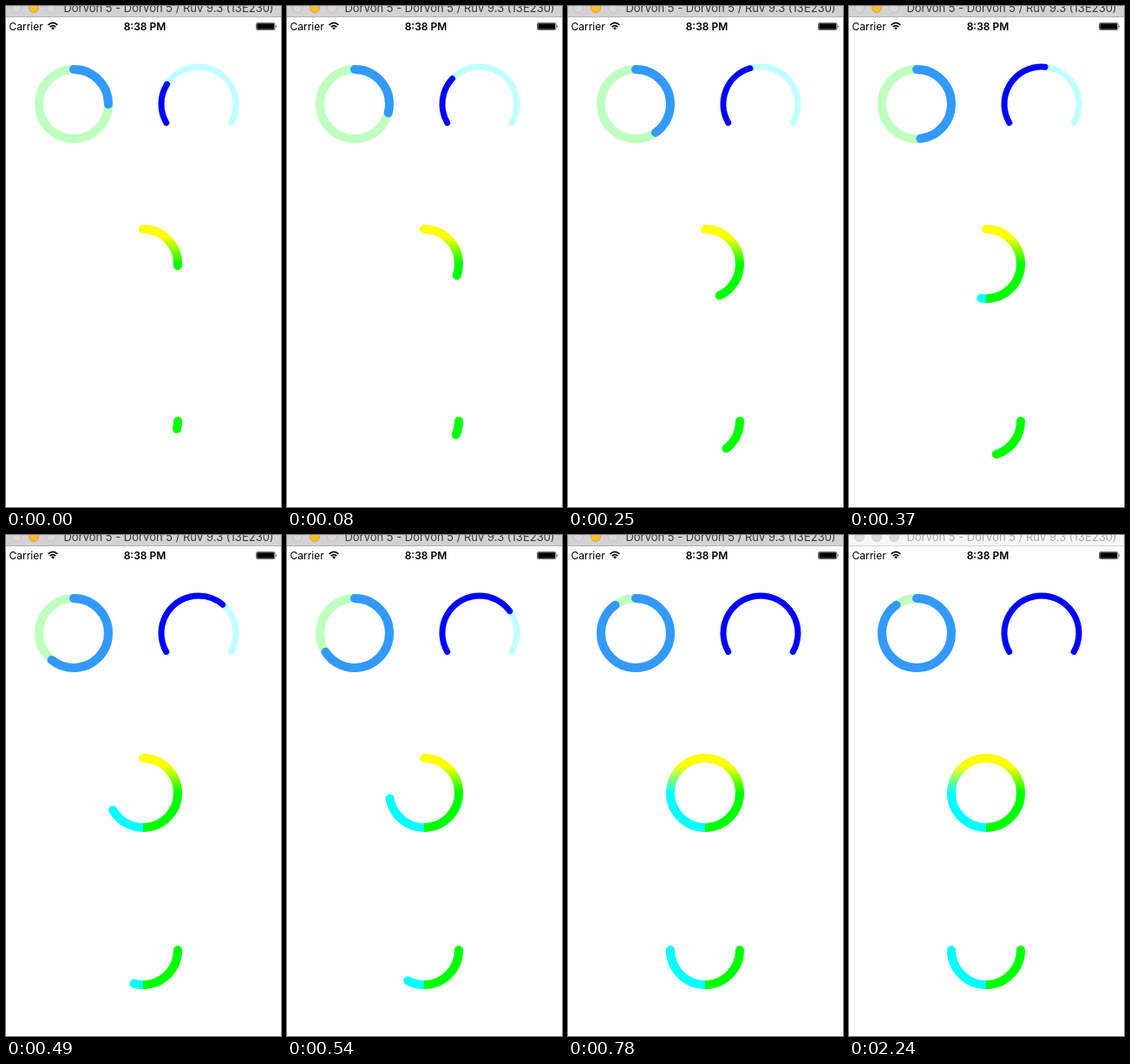
These frames come from a looping animation (317x577 px, 2.33 s). An HTML page:

```html
<!DOCTYPE html>
<html lang="en">
<head>
<meta charset="utf-8">
<title>Progress rings</title>
<style>
  html, body { margin: 0; width: 100%; height: 100%; overflow: hidden; background: #fefefe; }
  svg { display: block; width: 317px; height: 577px; }
  text { font-family: Inter, Roboto, sans-serif; font-size: 12px; }
  .arc { fill: none; stroke-linecap: round; stroke-width: 10; }
  .thin { stroke-width: 7; }

  #bar rect { fill: #d3d1d3; }
  #bar line { stroke: #b3b1b3; }
  #bar circle { fill: #d9d7d9; stroke: #c3c1c3; }
  #bar .mid { fill: #fdbd2f; stroke: #e3a32c; }
  #bar text { font-size: 13px; fill: #3c3b3c; }

  #bar.idle rect { fill: #f6f6f6; }
  #bar.idle line { stroke: #d6d6d6; }
  #bar.idle circle { fill: #dadada; stroke: #d2d2d2; }
  #bar.idle text { fill: #a9a9a9; }
</style>
</head>
<body>
<svg viewBox="0 0 317 577">
  <defs>
    <linearGradient id="warmGreen" gradientUnits="userSpaceOnUse" x1="0" y1="266" x2="0" y2="297">
      <stop stop-color="#ff0"/><stop offset="1" stop-color="#0f0"/>
    </linearGradient>
    <linearGradient id="warmCyan" gradientUnits="userSpaceOnUse" x1="0" y1="266" x2="0" y2="297">
      <stop stop-color="#ff0"/><stop offset="1" stop-color="#0ff"/>
    </linearGradient>
    <clipPath id="left"><rect x="0" y="240" width="158" height="300"/></clipPath>
    <clipPath id="right"><rect x="158" y="240" width="159" height="300"/></clipPath>
  </defs>

  <g id="bar">
    <rect width="317" height="13"/>
    <line x1="0" y1="12.5" x2="317" y2="12.5"/>
    <circle cx="12" cy="2" r="5.5"/>
    <circle class="mid" cx="32" cy="2" r="5.5"/>
    <circle cx="52" cy="2" r="5.5"/>
    <text x="187.5" y="7" text-anchor="middle">Dorvon 5 - Dorvon 5 / Ruv 9.3 (13E230)</text>
  </g>

  <g id="status">
    <text x="3.5" y="27.5">Carrier</text>
    <g fill="none" stroke="#000" stroke-width="1.7">
      <path d="M48.6 21.8Q54 16.9 59.4 21.8"/>
      <path d="M50.7 24Q54 21.1 57.3 24"/>
    </g>
    <path d="M52 25.2Q54 23.7 56 25.2L54 27.4Z"/>
    <text x="160" y="27.5" text-anchor="middle" font-weight="600">8:38 PM</text>
    <rect x="288.5" y="19.5" width="21.5" height="8" rx="1.5" fill="none" stroke="#000" stroke-width=".6"/>
    <rect x="289.3" y="20.3" width="19.9" height="6.4" rx=".8"/>
    <path d="M311 22q1.6 1.5 0 3z"/>
  </g>

  <g id="rings"></g>
</svg>
<script>
const LOOP = 2330, IDLE_AT = 2240;
const TICKS = [0, 20, 80, 130, 190, 250, 310, 350, 400, 450, 490, 540, 600, 660, 720, 780];
const bar = document.getElementById('bar');
const rings = document.getElementById('rings');
const moving = [];

// Clockwise arc; angles in degrees from the right-hand side.
function arcPath(cx, cy, r, from, sweep) {
  const at = deg => {
    const a = deg * Math.PI / 180;
    return `${cx + r * Math.cos(a)} ${cy + r * Math.sin(a)}`;
  };
  const half = `A${r} ${r} 0 0 1 `;
  return `M${at(from)}${half}${at(from + sweep / 2)}${half}${at(from + sweep)}`;
}

function addArc(shape, stroke, { thin, clip, grow } = {}) {
  const path = document.createElementNS('http://www.w3.org/2000/svg', 'path');
  path.setAttribute('d', arcPath(...shape));
  path.setAttribute('class', thin ? 'arc thin' : 'arc');
  path.setAttribute('stroke', stroke);
  if (clip) path.setAttribute('clip-path', `url(#${clip})`);
  if (grow) {
    path.setAttribute('pathLength', 1);
    moving.push({ path, grow });
  }
  rings.append(path);
}

const blue = [78, 113, 40, -90, 360];
const gauge = [222, 113, 43, 150, 240];
const wheel = [158, 297, 40, -90, 360];
const smile = [158, 478, 40, 0, 180];
const fromFifth = e => 0.2 + 0.8 * e;

addArc(blue, '#bfffbf');
addArc(blue, '#39f', { grow: e => 0.2 + 0.7 * e });
addArc(gauge, '#bfffff', { thin: true });
addArc(gauge, '#00f', { thin: true, grow: fromFifth });
addArc(wheel, 'url(#warmCyan)', { clip: 'left', grow: fromFifth });
addArc(wheel, 'url(#warmGreen)', { clip: 'right', grow: fromFifth });
addArc(smile, '#0ff', { clip: 'left', grow: e => e });
addArc(smile, '#0f0', { clip: 'right', grow: e => e });

// cubic-bezier(.42, 0, 1, 1)
function easeIn(x) {
  if (x >= 1) return 1;
  let lo = 0, hi = 1;
  for (let i = 0; i < 30; i++) {
    const s = (lo + hi) / 2, u = 1 - s;
    if (1.26 * s * u * u + 3 * s * s * u + s ** 3 < x) lo = s; else hi = s;
  }
  return lo * lo * (3 - 2 * lo);
}

function draw(now) {
  const t = now % LOOP;
  const tick = TICKS.findLast(k => k <= t);
  const e = easeIn(0.218 + 0.00103 * tick);
  for (const { path, grow } of moving) {
    path.setAttribute('stroke-dasharray', `${grow(e)} 2`);
  }
  bar.classList.toggle('idle', t >= IDLE_AT);
}

const start = performance.now();
function loop() {
  draw(performance.now() - start);
  requestAnimationFrame(loop);
}
loop();
</script>
</body>
</html>
```
